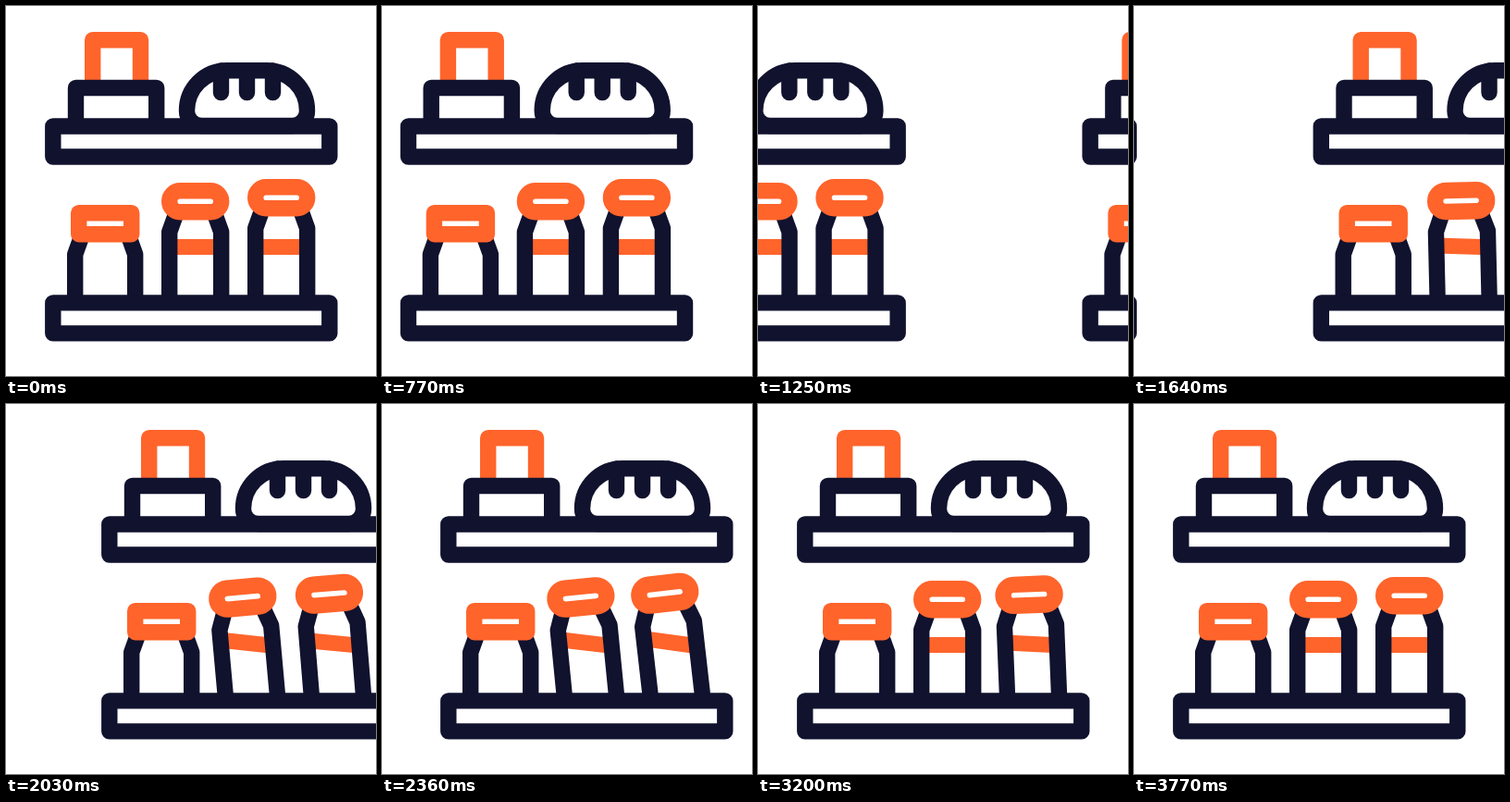
These frames come from a looping animation (400 by 400 pixels, 3.83 s). An HTML page:

```html
<!DOCTYPE html>
<html lang="en">
<head>
<meta charset="utf-8">
<title>Pantry shelves</title>
<style>
  html, body { margin: 0; width: 100%; height: 100%; overflow: hidden; background: #fff; }
  svg { display: block; width: 100%; height: 100%; }
  path, rect { fill: none; stroke-width: 17.4; }
  .navy { stroke: #11122e; stroke-linejoin: round; }
  .orange { stroke: #ff642b; stroke-linejoin: round; }
  .band { fill: #ff642b; }
</style>
</head>
<body>
<svg id="stage" viewBox="0 0 400 400"></svg>
<script>
const LOOP = 3830;
const SPAN = 507;
const stage = document.getElementById('stage');

const path = (cls, d) => `<path class="${cls}" d="${d}"/>`;
const box = (cls, x, y, w, h, r = 0) =>
  `<rect class="${cls}" x="${x}" y="${y}" width="${w}" height="${h}" rx="${r}"/>`;
const shelf = y => box('navy', 50.8, y, 299, 33);

// Two legs narrowing to a neck, from the base line up
const body = (x, w, y) =>
  path('navy', `M${x} 320V${y}l6.5-18M${x + w} 320V${y}l-6.5-18`);

const bottle = (x, y) => `<g class="bottle">
  <g class="liquid">${box('band', x, 252, 56, 17)}</g>
  ${body(x, 56, y + 44.5)}${box('orange', x, y, 56, 23, 11.5)}</g>`;

const scene = () => `<g class="scene">
  ${path('orange', 'M93.7 88V36.7H145.5V88')}
  ${path('navy', 'M75.5 129V88.5H162.7V129')}
  ${path('navy', 'M239 69.7H282A43.5 43.5 0 0 1 325.5 113.2A16 16 0 0 1 309.5 129.5H211.5A16 16 0 0 1 195.5 113.2A43.5 43.5 0 0 1 239 69.7Z')}
  <g stroke-linecap="round">${path('navy', 'M232.5 70V93.5M260.5 70V93.5M288.5 70V93.5')}</g>
  ${shelf(130)}
  ${body(74.7, 65, 268.5)}${box('orange', 78.7, 223.7, 57, 23)}
  ${bottle(176.7, 199.7)}${bottle(269.7, 195.7)}
  ${shelf(320.9)}</g>`;

stage.innerHTML = scene() + scene();
const [leaving, arriving] = stage.querySelectorAll('.scene');

const tilts = [
  { x: 176.7, peak: 6, rise: [1380, 2230], fall: [2230, 3110] },
  { x: 269.7, peak: 6.5, rise: [1460, 2340], fall: [2390, 3750] }
];
arriving.querySelectorAll('.bottle').forEach((el, i) => {
  tilts[i].el = el;
  tilts[i].liquid = el.querySelector('.liquid');
});

const progress = (t, [a, b]) => Math.min(1, Math.max(0, (t - a) / (b - a)));
const smooth = u => u * u * (3 - 2 * u);

// Cubic bezier easing with flat ends: (x1, 0, x2, 1)
function ease(u, x1, x2) {
  let lo = 0, hi = 1;
  for (let i = 0; i < 24; i++) {
    const s = (lo + hi) / 2, r = 1 - s;
    if (3 * s * r * r * x1 + 3 * s * s * r * x2 + s * s * s < u) lo = s;
    else hi = s;
  }
  return u <= 0 ? 0 : u >= 1 ? 1 : smooth(lo);
}

function draw(t) {
  const shift = SPAN * ease(progress(t, [503, 2912]), 0.335, 0.292);
  leaving.setAttribute('transform', `translate(${-shift} 0)`);
  arriving.setAttribute('transform', `translate(${SPAN - shift} 0)`);
  for (const { el, liquid, x, peak, rise, fall } of tilts) {
    const angle = peak * (smooth(progress(t, rise)) - smooth(progress(t, fall)));
    el.setAttribute('transform', `rotate(${-angle} ${x} 320)`);
    liquid.setAttribute('transform', `rotate(${2.2 * angle} ${x + 28} 260.5)`);
  }
}

const start = performance.now();
function tick() {
  draw((performance.now() - start) % LOOP);
  requestAnimationFrame(tick);
}
tick();
</script>
</body>
</html>
```
